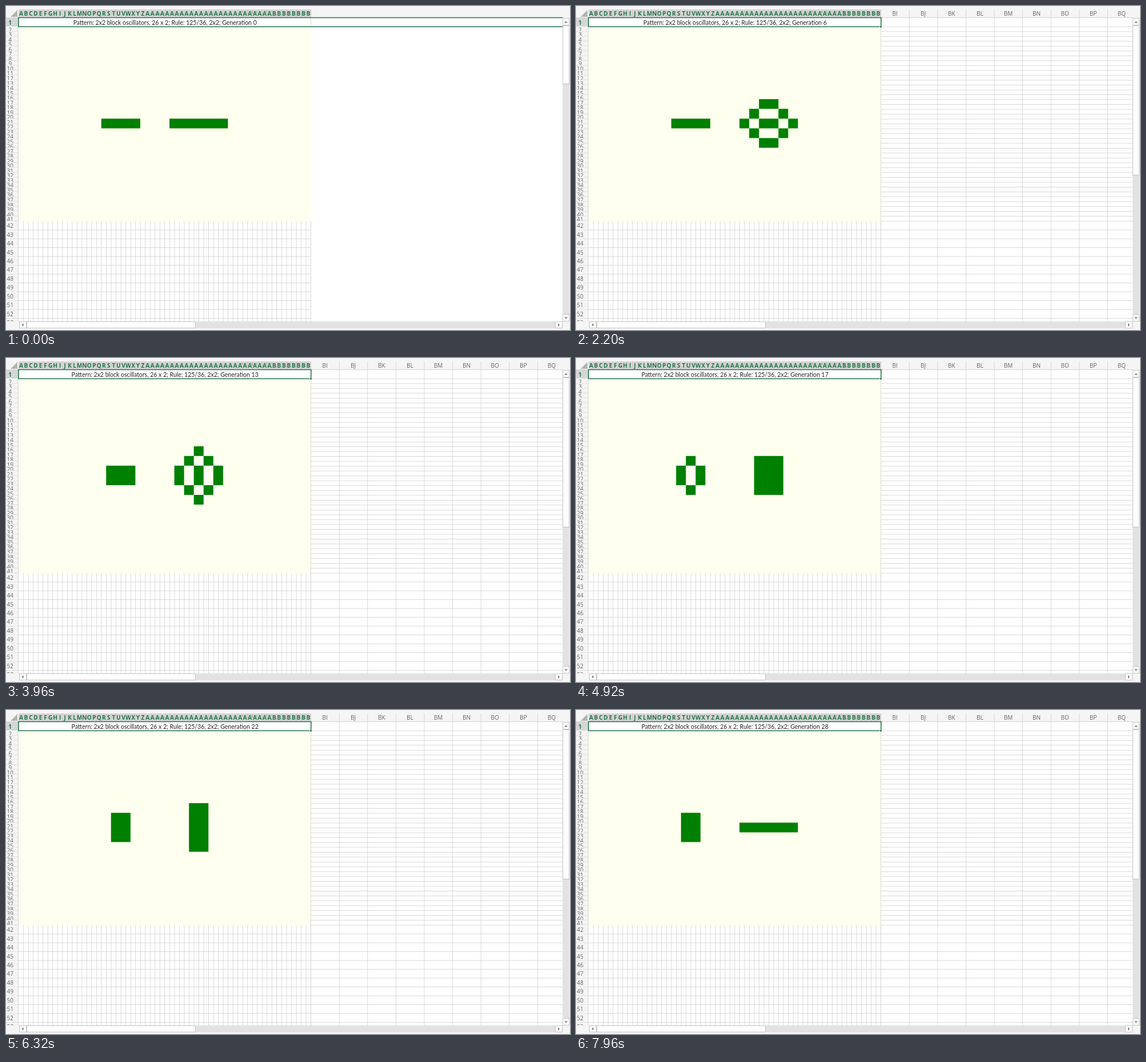
Recreate the animation shown at these times as an HTML page. Size 987 by 568 pixels, loop 8 s.

```html
<!DOCTYPE html>
<html lang="en">
<head>
<meta charset="utf-8">
<title>2x2 block oscillators</title>
<style>
html, body { margin: 0; width: 100%; height: 100%; overflow: hidden; background: #f5f5f5; }
svg { display: block; }
.ui { font-family: "Open Sans", "Noto Sans", sans-serif; font-size: 10px; fill: #666; }
.ui .on { font-weight: 700; fill: #217346; }
.title { font-family: Lato, sans-serif; font-size: 10.5px; fill: #222; }
</style>
</head>
<body>
<svg id="stage" width="987" height="568" viewBox="0 0 987 568"></svg>
<script>
const COLS = 60, ROWS = 40, LOOP = 8000;
const GREEN = '#217346', GRID = '#d0d0d0', HAIR = 0.8;
const SHEET_AT = 200;
// Moment at which generation 1, 2, 3 ... is complete
const DONE = [880, 1080, 1280, 1480, 1760, 2200, 2440, 2680, 2880, 3080, 3280, 3520, 3960, 4240,
  4480, 4680, 4920, 5200, 5400, 5920, 6120, 6320, 6560, 6760, 7240, 7480, 7680, 7960];
// Generations whose left half is painted early
const EARLY = { 6: 2000, 13: 3720, 20: 5680, 25: 7000 };
const SPLIT = 28;

// Cell edges fall between whole pixels
const colX = c => 21.8 + 8.525 * c;
const rowY = r => 35.5 + 8.52 * r;
const tallY = r => 376.8 + 15.48 * r;
const wideX = c => 533.3 + 49.6 * c;

function add(parent, tag, attrs, text) {
  const el = document.createElementNS('http://www.w3.org/2000/svg', tag);
  for (const key in attrs) el.setAttribute(key, attrs[key]);
  if (text !== undefined) el.textContent = text;
  parent.appendChild(el);
  return el;
}
const rect = (parent, x, y, width, height, fill) => add(parent, 'rect', { x, y, width, height, fill });
const hLine = (parent, x1, x2, y, color = GRID) => rect(parent, x1, y, x2 - x1, HAIR, color);
const vLine = (parent, x, y1, y2, color = GRID) => rect(parent, x - 0.1, y1, HAIR, y2 - y1, color);
const label = (parent, x, y, text, cls = '') =>
  add(parent, 'text', { x, y, class: cls, 'text-anchor': 'middle' }, text);
const clip = (parent, x, y, width, height) =>
  add(parent, 'svg', { x, y, width, height, overflow: 'hidden' });

function colName(n) {
  const letter = i => String.fromCharCode(65 + i);
  return n < 26 ? letter(n) : letter(Math.floor(n / 26) - 1) + letter(n % 26);
}

// Cellular automaton: survive on 1, 2, 5; birth on 3, 6
function seed() {
  const cells = new Uint8Array(COLS * ROWS);
  for (const r of [19, 20])
    for (let c = 17; c < 43; c++) cells[r * COLS + c] = c < 25 || c > 30 ? 1 : 0;
  return cells;
}
function evolve(cells) {
  return cells.map((alive, i) => {
    let n = -alive;
    for (let dy = -1; dy < 2; dy++)
      for (let dx = -1; dx < 2; dx++) n += cells[i + dy * COLS + dx] || 0;
    return (alive ? [1, 2, 5] : [3, 6]).includes(n) ? 1 : 0;
  });
}
// Neighbours in a row are joined into one run
function cellPath(cells, from, to) {
  let d = '';
  for (let r = 0; r < ROWS; r++)
    for (let c = from; c < to; c++) {
      const first = c;
      while (c < to && cells[r * COLS + c]) c++;
      if (c > first) d += `M${colX(first)} ${rowY(r)}H${colX(c)}V${rowY(r + 1)}H${colX(first)}Z`;
    }
  return d;
}
const generations = [seed()];
while (generations.length <= DONE.length) generations.push(evolve(generations.at(-1)));
const leftPaths = generations.map(g => cellPath(g, 0, SPLIT));
const rightPaths = generations.map(g => cellPath(g, SPLIT, COLS));

const stage = document.getElementById('stage');
rect(stage, 0, 0, 987, 568, '#f5f5f5');
rect(stage, 22, 20, 952, 533, '#fff');
const ui = add(stage, 'g', { class: 'ui' });

// Corner and column headers
add(ui, 'path', { d: 'M20 7V19H8Z', fill: '#b4b4b4' });
rect(ui, 22, 6, 512, 14, '#d6d6d6');
for (let c = 0; c < COLS; c++) {
  const box = clip(ui, colX(c), 6, 8.5, 14);
  const name = colName(c);
  if (c < 26) label(box, 4.6, 10.5, name, 'on');
  else add(box, 'text', { x: 0.9, y: 10.5, class: 'on' }, name);
  vLine(ui, colX(c + 1), 6, 19, '#c4c4c4');
}

// Row headers
rect(ui, 0, 20, 21, 16, '#d6d6d6');
label(ui, 7, 32.5, '1', 'on');
for (let r = 0; r < ROWS; r++) {
  const box = clip(ui, 0, rowY(r), 21, 8.8);
  label(box, 7.3, 10.3, r + 2);
  hLine(ui, 0, 21, rowY(r + 1), '#dcdcdc');
}
for (let r = 0; r < 12; r++) {
  const box = clip(ui, 0, tallY(r), 21, Math.min(16, 553 - tallY(r)));
  label(box, 7.3, 12.3, r + 42);
  if (r < 11) hLine(ui, 0, 21, tallY(r + 1), '#dcdcdc');
}
vLine(ui, 21, 36, 553, '#cfcfcf');

// Lower left grid and pattern field
for (let c = 1; c <= COLS; c++) vLine(stage, colX(c), 377, 553);
for (let r = 1; r < 12; r++) hLine(stage, 22, 534, tallY(r));
rect(stage, 22, 36, 511.3, 341, '#fffff0');
const left = add(stage, 'path', { fill: '#008000' });
const right = add(stage, 'path', { fill: '#008000' });

// Right part of the sheet
const sheet = add(stage, 'g', { class: 'ui' });
for (let c = 0; c < 9; c++) {
  vLine(sheet, wideX(c), 6, 553);
  label(sheet, wideX(c) + 24.8, 16.5, colName(COLS + c));
}
hLine(sheet, 534, 974, 20, '#c6c6c6');
for (let r = 0; r <= ROWS; r++) hLine(sheet, 534, 974, rowY(r) + 0.4);
for (let r = 1; r < 12; r++) hLine(sheet, 534, 974, tallY(r));

// Selection of the whole row, then of the merged title cell
rect(stage, 22, 21, 511, 15, '#fff');
const rowPick = add(stage, 'g', {});
vLine(rowPick, 533.3, 21, 36);
const cellPick = add(stage, 'g', {});
for (const y of [19.7, 35.6]) {
  rect(rowPick, 21, y, 953, 1.5, GREEN);
  rect(cellPick, 21, y, 513.6, 1.5, GREEN);
}
rect(cellPick, 533, 20, 1.6, 14, GREEN);
rect(cellPick, 531, 34, 5, 5, '#fff');
rect(cellPick, 532, 34.7, 3, 3, GREEN);
rect(stage, 21, 20, 1.6, 17, GREEN);
const title = add(stage, 'text', { x: 278.2, y: 32.5, class: 'title', 'text-anchor': 'middle' });

// Scroll bars
function button(x, y, width, height, arrow) {
  const el = add(stage, 'rect', { x: x + .5, y: y + .5, width: width - 1, height: height - 1, fill: '#fff', stroke: '#c3c3c3' });
  if (arrow) add(stage, 'path', { d: arrow, fill: '#777' });
  return el;
}
rect(stage, 974, 20, 13, 533, '#f5f5f5');
rect(stage, 974, 34, 12, 506, '#e2e2e2');
button(974, 21, 12, 13, 'M977 29.5H983L980 26.5Z');
const thumb = button(974, 34, 12, 103);
button(974, 540, 12, 13, 'M977 545.5H983L980 548.5Z');
rect(stage, 0, 553, 987, 15, '#f5f5f5');
rect(stage, 36, 553, 925, 12, '#e2e2e2');
button(23, 553, 13, 12, 'M30.5 556V562L27.5 559Z');
button(36, 553, 296, 12);
button(961, 553, 13, 12, 'M966 556V562L969 559Z');

function draw(t) {
  const gen = DONE.filter(at => at <= t).length;
  const ahead = t >= EARLY[gen + 1] ? 1 : 0;
  left.setAttribute('d', leftPaths[gen + ahead]);
  right.setAttribute('d', rightPaths[gen]);
  title.textContent = `Pattern: 2x2 block oscillators, 26 x 2; Rule: 125/36, 2x2; Generation ${gen}`;
  const full = t >= SHEET_AT;
  sheet.style.display = cellPick.style.display = full ? '' : 'none';
  rowPick.style.display = full ? 'none' : '';
  thumb.setAttribute('height', full ? 262 : 102);
}

const start = performance.now();
function tick() {
  draw((performance.now() - start) % LOOP);
  requestAnimationFrame(tick);
}
draw(0);
requestAnimationFrame(tick);
</script>
</body>
</html>
```
